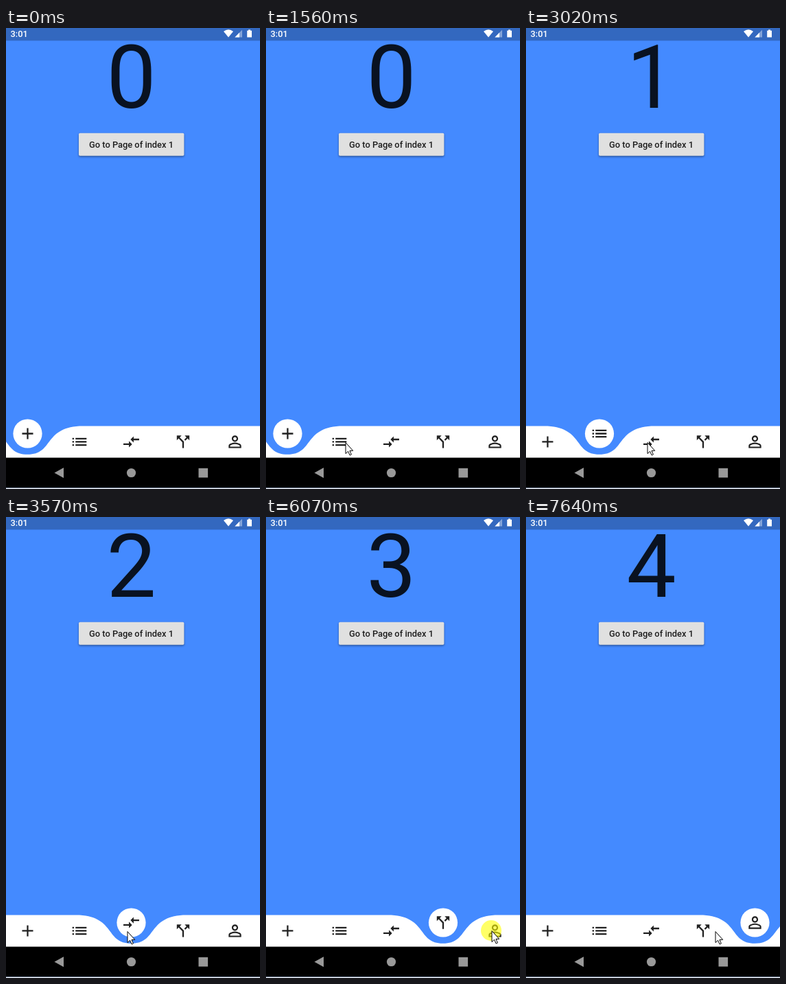
Recreate the animation shown at these times as an HTML page with a canvas. Size 370 by 670 pixels, loop 8 s.

```html
<!DOCTYPE html>
<html lang="en">
<head>
<meta charset="utf-8">
<title>Curved navigation</title>
<style>
html, body { margin: 0; width: 100%; height: 100%; overflow: hidden; }
canvas { display: block; }
</style>
</head>
<body>
<canvas id="stage" width="370" height="670"></canvas>
<script>
const ctx = document.getElementById('stage').getContext('2d');
const LOOP = 8000;
const DP = 0.9177;                 // pixels per device unit
const LEFT = -6.25, WIDTH = 377.5; // the phone screen is slightly wider than the stage
const ITEM = WIDTH / 5;
const BAR_TOP = 578.5, BAR_BOTTOM = 624.5, SCREEN_BOTTOM = 668.5;
const INK = 'rgba(0,0,0,0.87)';

const icons = [
  'M19 13h-6v6h-2v-6H5v-2h6V5h2v6h6v2z',
  'M3 13h2v-2H3v2zm0 4h2v-2H3v2zm0-8h2V7H3v2zm4 4h14v-2H7v2zm0 4h14v-2H7v2zM7 7v2h14V7H7z',
  'M9.01 14H2v2h7.01v3L13 15l-3.99-4v3zm5.98-1v-3H22V8h-7.01V5L11 9l3.99 4z',
  'M14 4l2.29 2.29-2.88 2.88 1.42 1.42 2.88-2.88L20 10V4zm-4 0H4v6l2.29-2.29 4.71 4.7V20h2v-8.41l-5.29-5.3z',
  'M12 5.9c1.16 0 2.1.94 2.1 2.1s-.94 2.1-2.1 2.1S9.9 9.16 9.9 8s.94-2.1 2.1-2.1m0 9c2.97 0 6.1 1.46 6.1 2.1v1.1H5.9V17c0-.64 3.13-2.1 6.1-2.1M12 4C9.79 4 8 5.79 8 8s1.79 4 4 4 4-1.79 4-4-1.79-4-4-4zm0 9c-2.67 0-8 1.34-8 4v3h16v-3c0-2.66-5.33-4-8-4z'
].map(d => new Path2D(d));
const arrow = new Path2D('M.5 .5V16.6L4.1 13.2 6.6 18.9 8.9 17.9 6.5 12.3H11.2Z');

// The screen refreshes only at these moments: [first, last, count]
const ticks = [
  [0, 0, 1], [630, 1410, 11], [1480, 1560, 2], [1790, 1790, 1], [2020, 2170, 3],
  [2720, 3020, 5], [3260, 3260, 1], [3480, 3570, 2], [3960, 4190, 4], [4440, 4440, 1],
  [4680, 4730, 2], [5510, 5910, 6], [6070, 6300, 2], [6440, 6530, 2], [6930, 7240, 5],
  [7410, 7640, 2]
].flatMap(([a, b, n]) => Array.from({ length: n }, (_, i) => a + (b - a) * i / Math.max(1, n - 1)));

const slideEnds = [2170, 3570, 4730, 6530];
const SLIDE = 200;
const clicks = [[1790, 2020], [3260, 3480], [4440, 4680], [6070, 6300], [7410, 7640]];
const pointerKeys = [
  [630, 279, 656], [1410, 124.5, 607.5], [1560, 115, 602],
  [2645, 115, 602], [3020, 176, 602],
  [3885, 176, 602], [4190, 256, 598],
  [5430, 256, 598], [5910, 328, 601],
  [6850, 328, 601], [7240, 275, 602]
];

const ease = p => p * p * (3 - 2 * p);
const clamp = p => Math.min(1, Math.max(0, p));

function fillPath(color, d) {
  ctx.fillStyle = color;
  ctx.fill(new Path2D(d));
}

function rect(color, x, y, w, h) {
  ctx.fillStyle = color;
  ctx.fillRect(x, y, w, h);
}

function disc(color, x, y, r) {
  ctx.fillStyle = color;
  ctx.beginPath();
  ctx.arc(x, y, r, 0, 2 * Math.PI);
  ctx.fill();
}

function label(text, x, y, size, weight, color, align) {
  ctx.font = `${weight} ${size}px Roboto, sans-serif`;
  ctx.textAlign = align;
  ctx.fillStyle = color;
  ctx.fillText(text, x, y);
}

function icon(i, x, y, alpha = 1) {
  const k = 30 / 24 * DP;
  ctx.save();
  ctx.globalAlpha = alpha;
  ctx.translate(x, y);
  ctx.scale(k, k);
  ctx.translate(-12, -12);
  ctx.fillStyle = INK;
  ctx.fill(icons[i]);
  ctx.restore();
}

function drawStatus() {
  rect('#3368bf', 0, 0, 370, 18.4);
  label('3:01', 6.5, 13, 12.85, 500, '#fff', 'left');
  fillPath('#fff', 'M317 5Q324 -.6 331 5L324 13.4Z');
  fillPath('rgba(255,255,255,.4)', 'M344 2.8V13.4H333.4Z');
  fillPath('#fff', 'M340 6.8V13.4H333.4Z');
  fillPath('#fff', 'M353 2.5h3v1.2h2v9.9h-6.8V3.7h1.8Z');
}

function drawPage(page) {
  label(page, 182.5, 116.2, 128.5, 400, INK, 'center');
  ctx.save();
  ctx.shadowColor = 'rgba(0,0,0,.4)';
  ctx.shadowBlur = 3;
  ctx.shadowOffsetY = 1.5;
  ctx.fillStyle = '#e0e0e0';
  ctx.beginPath();
  ctx.roundRect(106, 152.7, 153.4, 33, 1.8);
  ctx.fill();
  ctx.restore();
  label('Go to Page of index 1', 182.5, 174, 12.85, 500, INK, 'center');
}

function drawBar(pos, shown, sink) {
  const center = LEFT + (pos + 0.5) * ITEM;
  const buttonY = BAR_TOP + (12 + 80 * sink) * DP;
  disc('#fff', center, buttonY, 23 * DP);
  icon(shown, center, buttonY);

  // White bar with a notch under the floating button
  const x = f => center + f * WIDTH, y = f => BAR_TOP + f * 75 * DP;
  ctx.fillStyle = '#fff';
  ctx.beginPath();
  ctx.moveTo(LEFT - ITEM, BAR_TOP);
  ctx.lineTo(x(-0.2), BAR_TOP);
  ctx.bezierCurveTo(x(-0.06), y(0.05), x(-0.1), y(0.6), x(0), y(0.6));
  ctx.bezierCurveTo(x(0.1), y(0.6), x(0.06), y(0.05), x(0.2), BAR_TOP);
  ctx.lineTo(LEFT + WIDTH + ITEM, BAR_TOP);
  ctx.lineTo(LEFT + WIDTH + ITEM, y(1));
  ctx.lineTo(LEFT - ITEM, y(1));
  ctx.fill();

  for (let i = 0; i < 5; i++) {
    const near = Math.min(1, Math.abs(pos - i));
    icon(i, LEFT + (i + 0.5) * ITEM, BAR_TOP + (25 + 40 * (1 - near)) * DP, near);
  }
}

function drawSystemBar() {
  rect('#000', 0, BAR_BOTTOM, 370, SCREEN_BOTTOM - BAR_BOTTOM);
  rect('#eee', 0, SCREEN_BOTTOM, 370, 670 - SCREEN_BOTTOM);
  fillPath('#999', 'M70.5 646.5L84 639V654Z');
  disc('#999', 182.5, 646.5, 6.6);
  rect('#999', 280.5, 639.8, 13.6, 13.6);
}

function drawPointer(t) {
  if (t < pointerKeys[0][0]) return;
  const next = pointerKeys.findIndex(k => k[0] > t);
  const b = pointerKeys.at(next), a = next < 0 ? b : pointerKeys[next - 1];
  const p = next < 0 ? 0 : ease((t - a[0]) / (b[0] - a[0]));
  const x = a[1] + (b[1] - a[1]) * p, y = a[2] + (b[2] - a[2]) * p;

  if (clicks.some(([on, off]) => t >= on && t < off)) disc('rgba(255,255,0,.6)', x, y, 15);
  ctx.save();
  ctx.translate(x + 0.5, y);
  ctx.fillStyle = '#fff';
  ctx.fill(arrow);
  ctx.strokeStyle = '#000';
  ctx.lineWidth = 1;
  ctx.stroke(arrow);
  ctx.restore();
}

function draw(now) {
  const time = now % LOOP;
  const t = ticks.findLast(tick => tick <= time + 0.01) ?? 0;

  let pos = 0, page = 0, shown = 0, sink = 0;
  for (const end of slideEnds) {
    const p = ease(clamp((t - end + SLIDE) / SLIDE));
    pos += p;
    if (p > 0) page++;
    if (p > 0.5) shown++;
    sink += 1 - Math.abs(1 - 2 * p);
  }

  rect('#448aff', 0, 0, 370, 670);
  drawStatus();
  drawPage(page);
  drawBar(pos, shown, sink);
  drawSystemBar();
  drawPointer(t);
}

const start = performance.now();
function loop() {
  draw(performance.now() - start);
  requestAnimationFrame(loop);
}
loop();
</script>
</body>
</html>
```
